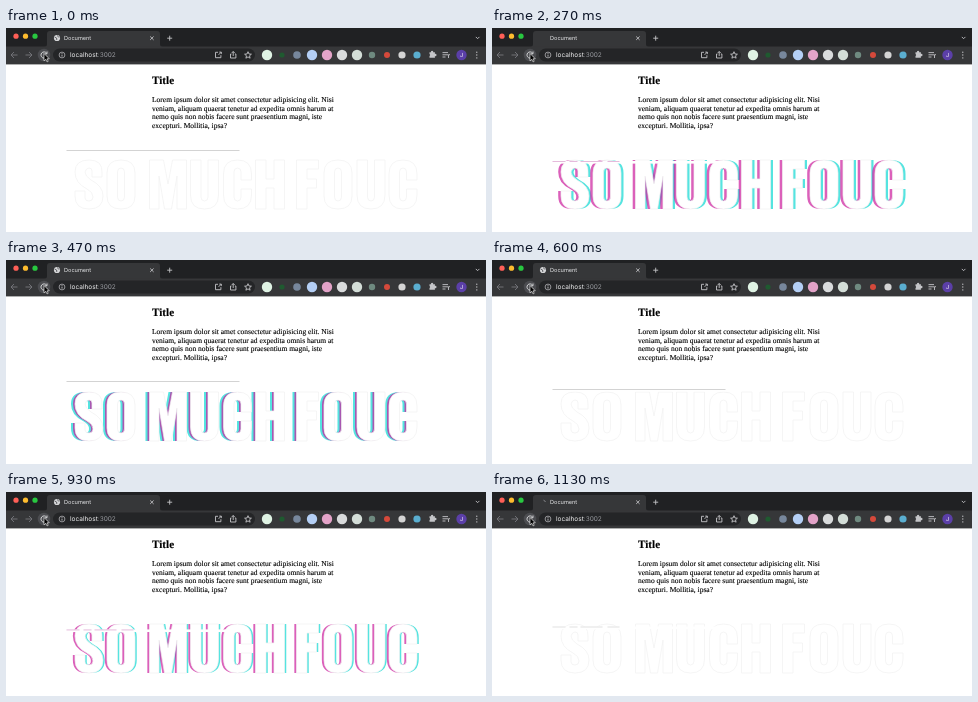
These frames come from a looping animation (480x204 px, 1.19 s). An HTML page:

```html
<!DOCTYPE html>
<html lang="en">
<head>
<meta charset="utf-8">
<title>Document</title>
<style>
html, body { margin: 0; width: 100%; height: 100%; overflow: hidden; background: #fff; }
svg { display: block; width: 100%; height: 100%; }
text { text-rendering: geometricPrecision; }
.ui { font-family: Inter, Roboto, sans-serif; }
.page { font: 7.5px "Liberation Serif", serif; stroke: #000; stroke-width: .12; }
.line { fill: none; stroke: #c4c5c8; stroke-width: .9; }
</style>
</head>
<body>
<svg viewBox="0 0 480 204">
  <defs><g id="word" fill-rule="evenodd"></g></defs>

  <!-- tab strip -->
  <rect width="480" height="19" fill="#202123"/>
  <circle cx="10" cy="8.2" r="2.6" fill="#ff5f57"/>
  <circle cx="19.5" cy="8.2" r="2.6" fill="#febc2e"/>
  <circle cx="29" cy="8.2" r="2.6" fill="#28c840"/>
  <path d="M38 19Q41 19 41 16V6Q41 3 44 3H151Q154 3 154 6V16Q154 19 157 19Z" fill="#363739"/>
  <g id="globe">
    <circle cx="51" cy="10" r="3.1" fill="#d5d6d8"/>
    <path d="M48.6 9l2 1 .2 2M51 7.5l1.5 1.4 1 .1" fill="none" stroke="#45464a" stroke-width=".8"/>
  </g>
  <path id="spinner" d="M51.5 8.2A2.4 2.4 0 0 1 53.4 10" fill="none" stroke="#8b8c90" stroke-width=".9"/>
  <text class="ui" x="58" y="12.2" font-size="5.6" fill="#e8e9eb">Document</text>
  <path class="line" d="M144.2 8.5l3.4 3.4m0-3.4l-3.4 3.4M161.2 10.2h5m-2.5-2.5v5"/>
  <path class="line" d="M469.8 8.9l1.8 1.8 1.8-1.8"/>

  <!-- toolbar -->
  <rect y="18.5" width="480" height="17.9" fill="#363739"/>
  <path class="line" style="stroke:#77787c" d="M11.5 27H5m3-3l-3 3 3 3M19.5 27H26m-3-3l3 3-3 3"/>
  <circle cx="38" cy="27" r="6.3" fill="#4b4c50"/>
  <path class="line" style="stroke:#e0e1e3" d="M40.6 25.2A3.1 3.1 0 1 0 41 28M41 23.5V25.8H38.7"/>
  <rect x="47" y="20.5" width="202" height="13" rx="6.5" fill="#242527"/>
  <circle class="line" cx="56" cy="27" r="2.9" style="stroke-width:.7"/>
  <path class="line" d="M56 26.6v2M56 25.1v.8"/>
  <text class="ui" x="64" y="29.3" font-size="6.5" fill="#f1f1f2">localhost<tspan fill="#96989d">:3002</tspan></text>
  <path class="line" d="M212 24.3h-2.5v5.4h5.4v-2.5M212.6 26.8l2.7-2.7m-2 0h2v2M225.5 26h-1v4h5.4v-4h-1M227.2 28v-4.5m-1.5 1.5l1.5-1.5 1.5 1.5M242 23.7l1 2.3 2.4.2-1.9 1.6.6 2.4-2.1-1.3-2.1 1.3.6-2.4-1.9-1.6 2.4-.2Z"/>
  <g id="badges"></g>
  <path d="M428 24.2h1.6a1.1 1.1 0 1 1 2 0h1.8v1.8a1.1 1.1 0 1 1 0 2v1.8h-5.4v-1.8a1.1 1.1 0 0 0 0-2Z" transform="translate(-4.5 0)" fill="#c4c5c8"/>
  <path class="line" d="M436.5 24.6h5.5m-5.5 2.2h5.5m-5.5 2.2h3M442.5 30v-3.3h1.5"/>
  <circle cx="455.5" cy="27" r="5.2" fill="#5b3fa8"/>
  <text class="ui" x="455.5" y="29.1" font-size="5.6" text-anchor="middle" fill="#fff">J</text>
  <path d="M470.8 24.2v.1m0 2.7v.1m0 2.7v.1" stroke="#c4c5c8" stroke-width="1.3" stroke-linecap="round"/>
  <path d="M38 25.5v7.4l1.8-1.6 1.2 2.6 1.2-.6-1.2-2.5h2.3Z" fill="#000" stroke="#fff" stroke-width=".6"/>

  <!-- page -->
  <g id="styled" class="page">
    <text x="146" y="55.5" font-size="11.2" font-weight="bold">Title</text>
    <text x="146" y="74.3">Lorem ipsum dolor sit amet consectetur adipisicing elit. Nisi</text>
    <text x="146" y="82.7">veniam, aliquam quaerat tenetur ad expedita omnis harum at</text>
    <text x="146" y="91.1">nemo quis non nobis facere sunt praesentium magni, iste</text>
    <text x="146" y="99.5">excepturi. Mollitia, ipsa?</text>
  </g>
  <g id="plain" class="page">
    <text x="1.3" y="55.5" font-size="11.2" font-weight="bold">Title</text>
    <text x="1.3" y="74.3">Lorem ipsum dolor sit amet consectetur adipisicing elit. Nisi veniam, aliquam quaerat tenetur ad expedita omnis harum at nemo quis non nobis facere sunt</text>
    <text x="1.3" y="82.7">praesentium magni, iste excepturi. Mollitia, ipsa?</text>
  </g>

  <!-- glitch headline -->
  <use id="cyan" href="#word" fill="#55e4e0"/>
  <use id="pink" href="#word" fill="#cc1e9e" opacity=".7"/>
  <use href="#word" fill="#fff" stroke="#f1f1f1" stroke-width=".7"/>
  <g id="bar">
    <rect x="60" width="174" height="2.6" fill="#fff"/>
    <path id="rule" d="M60.5 .5H233.5" fill="none" stroke-width=".9"/>
  </g>
</svg>
<script>
const LOOP = 1190, STEP = 1000 / 15;
const $ = id => document.getElementById(id);

const glyphs = {
  S: 'M27 17H17V11Q17 8 14 8T10 12Q10 16 16 20Q28 26 28 36Q28 49 14 49T0 36V31H10V38Q10 41 14 41T18 37Q18 32 12 29Q0 23 0 12Q0 0 14 0T27 13Z',
  O: 'M0 13Q0 0 14 0T28 13V36Q28 49 14 49T0 36ZM10.5 12V37Q10.5 41 14 41T17.5 37V12Q17.5 8 14 8T10.5 12Z',
  M: 'M0 0H14L18.5 24L23 0H37V49H27.5V16L22 49H15L9.5 16V49H0Z',
  U: 'M0 0H10.5V37Q10.5 41 14 41T17.5 37V0H28V35Q28 49 14 49T0 35Z',
  C: 'M28 20H17.5V12Q17.5 8 14 8T10.5 12V37Q10.5 41 14 41T17.5 37V29H28V35Q28 49 14 49T0 35V14Q0 0 14 0T28 14Z',
  H: 'M0 0H10.5V19H18.5V0H29V49H18.5V28H10.5V49H0Z',
  F: 'M0 0H22V9H10.5V19H20V28H10.5V49H0Z'
};
const starts = [69, 101, 143.5, 184.5, 217.5, 249.5, 290.5, 318, 351, 383];
$('word').innerHTML = [...'SOMUCHFOUC'].map((c, i) =>
  `<path transform="translate(${starts[i]} 132)" d="${glyphs[c]}"/>`).join('');

const badges = [
  ['#dff3e4', 5.2], ['#1f5a30', 2.6], ['#77879c', 3.8], ['#b4cff5', 5.2], ['#e3a3c8', 5.2],
  ['#d9dbdc', 5.2], ['#d3ddd7', 5.2], ['#6f8a80', 3.2], ['#d5493b', 3], ['#d4d4d4', 3.6], ['#5aaed0', 3.6]
];
$('badges').innerHTML = badges.map(([color, r], i) =>
  `<circle cx="${261 + 15 * i}" cy="27" r="${r}" fill="${color}"/>`).join('');

// time, pink shift, cyan shift, bar height on the page
const keys = [
  [0, 0, 0, 122], [170, -2, 2, 139], [270, -2.8, 2.5, 133], [470, -2, -4, 121], [600, 0, 0, 129],
  [800, 2.6, 5, 141], [1000, -4.7, 0, 135.5], [1130, 0, 0, 134.5], [1190, 0, 0, 122]
];

function pose(t) {
  const i = keys.findIndex(k => k[0] > t), a = keys[i - 1], b = keys[i];
  const p = (t - a[0]) / (b[0] - a[0]);
  return a.map((v, j) => v + (b[j] - v) * p);
}

const show = (id, on) => $(id).style.display = on ? '' : 'none';

function draw(now) {
  const step = Math.floor((now % LOOP + 3.4) / STEP) % 18;
  const t = Math.round(step * STEP / 10) * 10;
  const [, pink, cyan, y] = pose(t);
  const load = step % 11;
  show('globe', load < 4 || load > 6);
  show('spinner', load === 6);
  show('plain', step === 15);
  show('styled', step !== 15);

  $('pink').setAttribute('x', pink);
  $('cyan').setAttribute('x', cyan);
  show('cyan', cyan !== 0);
  show('pink', pink !== 0);

  $('bar').setAttribute('transform', `translate(0 ${y})`);
  const rule = $('rule'), torn = y > 131;
  rule.setAttribute('stroke', torn ? (pink < 0 ? '#e3b4d9' : '#dedede') : '#cfcfcf');
  rule.setAttribute('stroke-dasharray', torn ? '13 4 8 3 22 5 12 200' : 'none');
  show('rule', y < 138);
}

function tick(now) {
  draw(now);
  requestAnimationFrame(tick);
}
draw(0);
requestAnimationFrame(tick);
</script>
</body>
</html>
```
